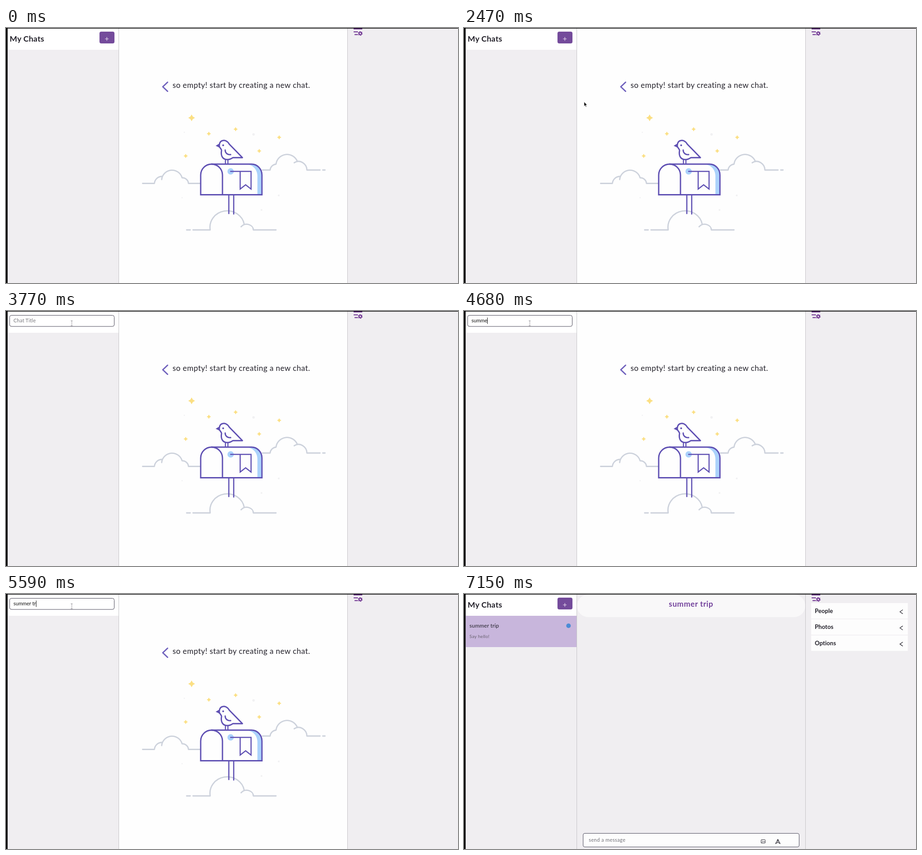
These frames come from a looping animation (996 px wide and 562 px high, 8 s). An HTML page:

```html
<!DOCTYPE html>
<html lang="en">
<head>
<meta charset="utf-8">
<title>Creating a chat</title>
<style>
  html, body { margin: 0; width: 100%; height: 100%; overflow: hidden; background: #f0eef1; }
  svg { display: block; font-family: Lato, "Open Sans", sans-serif; fill: #24222b; }
  text { white-space: pre; }
  .line { fill: none; stroke-linecap: round; stroke-linejoin: round; }
  .bold { font-weight: 700; }
  .cloud { stroke: #cdd2dc; stroke-width: 2.8; }
  .ink { stroke: #5f50b3; stroke-width: 2.9; }
  .off { display: none; }
</style>
</head>
<body>
<svg width="996" height="562" viewBox="0 0 996 562">
  <rect width="996" height="562" fill="#f0eef1"/>
  <rect x="4" y="1" width="244" height="47" fill="#fff"/>

  <g id="empty">
    <rect x="249" y="1" width="503" height="561" fill="#fefefe"/>
    <path class="line" d="M356 119.5L345.5 129.5L356 139.5" stroke="#7062bd" stroke-width="3"/>
    <text x="367" y="132" font-size="17" letter-spacing=".42">so empty! start by creating a new chat.</text>
    <g id="stars" fill="#fbdf83"></g>
    <g fill="#f1f1f3">
      <circle cx="545.5" cy="234.5" r="2.8"/>
      <circle cx="601" cy="369" r="2"/>
      <circle cx="563" cy="401" r="2"/>
      <circle cx="388" cy="374" r="1.4"/>
      <circle cx="393" cy="230" r="1.4"/>
    </g>
    <g class="line cloud">
      <path d="M301 342.5H327A17 17 0 0 1 343 327M343 334A23 23 0 0 1 388 330A14 13 0 0 1 402 342.5H428"/>
      <path d="M565 313H582A15 14 0 0 1 595 300A24.5 24.5 0 0 1 642 294M635 297C648 288 663 300 663 313H692M698 313H703"/>
      <path d="M398 445H406M412 445H450A38 36 0 0 1 525 433M518 438C528 427 545 434 545 445H595"/>
    </g>
    <path d="M534 301H541A23 24 0 0 1 564 324V367H554V326C554 314 546 303 534 301Z" fill="#abd2fb"/>
    <circle cx="495" cy="316" r="7" fill="#abd2fb"/>
    <g class="line ink" style="stroke-linejoin:miter">
      <path d="M429 367.5V324A24 24 0 0 1 477 324V367.5Z"/>
      <path d="M453 300H541A23 24 0 0 1 564 324V367.5H477"/>
      <path d="M495 316H540V355L528 345.5L516 355V316" stroke-width="2.5"/>
      <path d="M491 369V409M501.8 369V410" stroke-width="2.6"/>
      <path d="M483.5 290V299M489 290V299" stroke-width="2.4"/>
    </g>
    <path class="line ink" d="M521 285.7L492 256C488 249 482 247 478 248C472 249 470 254 470 260C470 264 475 266 475 270C473 280 476 290 488 290C494 290 498 287 500 285.7Z"/>
    <path class="line ink" d="M483 269C483 276 489 280 495 279" stroke-width="2.4"/>
    <path d="M462 259.5L470.5 254.5L471 264Z" fill="#5f50b3"/>
    <circle cx="478.5" cy="258.5" r="2" fill="#5f50b3"/>
  </g>

  <g id="room">
    <rect x="249" y="1" width="503" height="50" rx="25" fill="#f9f8f9"/>
    <text class="bold" x="500.3" y="28" font-size="17" letter-spacing=".6" text-anchor="middle" fill="#73429c">summer trip</text>
    <rect x="262.5" y="527.5" width="476" height="30" rx="3.5" fill="#fdfdfd" stroke="#4a485a"/>
    <text x="275" y="546" font-size="11" letter-spacing=".4" fill="#6f6f76">send a message</text>
    <g class="line" stroke="#33313a">
      <rect x="654.7" y="541.5" width="9" height="7.5" rx=".8"/>
      <path d="M656 548L658.5 545L660 546.5L661.5 545L663 547M657 543.8h.3"/>
      <path d="M691.6 540.5L696.7 550.3L691.6 547.3L686.5 550.3ZM691.6 541V547" stroke-width="1.2"/>
    </g>
    <g id="panels"></g>
  </g>

  <g id="row">
    <rect id="active" x="4" y="48" width="245" height="69" fill="#c8b6dc"/>
    <text x="12" y="74" font-size="12" letter-spacing=".15">summer trip</text>
    <text x="12" y="97" font-size="10" letter-spacing=".27" fill="#68616f">Say hello!</text>
    <circle cx="230.3" cy="70" r="5" fill="#4b8cd6"/>
  </g>

  <path d="M248.5 1V562M752.5 1V562" stroke="#c6c4c8"/>

  <g id="title">
    <text class="bold" x="8" y="29.5" font-size="17.5" letter-spacing=".3">My Chats</text>
    <rect x="206" y="8" width="33" height="26" rx="4" fill="#744b9b"/>
    <path d="M218.2 24H226.2M222.2 20V28" stroke="#efe6f5" stroke-width="1.1"/>
  </g>

  <g id="form">
    <rect x="8" y="9.5" width="230.5" height="24.5" rx="4" fill="#fff" stroke="#4b4858"/>
    <text id="hint" x="16.5" y="25.3" font-size="11" letter-spacing=".25" fill="#74747a">Chat Title</text>
    <text id="typed" x="16.5" y="25.3" font-size="11" fill="#111"></text>
    <path id="caret" d="M0 14.5V28.5" stroke="#111"/>
  </g>

  <g stroke="#6c3090" fill="none" stroke-width="2">
    <path d="M766 2H785M766 8.5H775.5M768 14.5H775.5"/>
    <circle cx="780.7" cy="12" r="2.7"/>
    <circle cx="780.7" cy="12" r="4.3" stroke-width="1.5" stroke-dasharray="2.25 2.25"/>
  </g>

  <path id="arrow" d="M0 0V10.2L2.3 8.1L4 11.8L5.6 11L4 7.5H7Z" fill="#151515" stroke="#fff" stroke-width=".8"/>
  <path id="beam" d="M143 21.5H147M145 22V32M143 32.5H147" fill="none" stroke="#77757c" stroke-dasharray="2 1"/>

  <path d="M0 0H996V1.2H3.5V562H0Z" fill="#000"/>
</svg>
<script>
const LOOP = 8000, STEP = 130;
const el = id => document.getElementById(id);
const show = (id, on) => el(id).classList.toggle('off', !on);

// x, y, radius
const stars = [[409, 198, 7.5], [447, 233, 4.8], [506, 223, 4.8], [602, 241, 4.8], [558, 271, 4.8], [396, 282, 4.8]];
el('stars').innerHTML = stars.map(([x, y, r]) => {
  const k = r * 0.36;
  return `<path d="M${x} ${y - r}l${k} ${r - k}l${r - k} ${k}l${k - r} ${k}l${-k} ${r - k}l${-k} ${k - r}l${k - r} ${-k}l${r - k} ${-k}z"/>`;
}).join('');

el('panels').innerHTML = ['People', 'Photos', 'Options'].map((label, i) => {
  const y = 20 + i * 35.6;
  return `<rect x="765" y="${y}" width="213" height="34.2" fill="#fdfdfd"/>
    <text class="bold" x="773" y="${y + 21.7}" font-size="13" letter-spacing=".05">${label}</text>
    <path class="line" d="M966.5 ${y + 15}L960.5 ${y + 19.2}L966.5 ${y + 23.4}" stroke="#33313a" stroke-width="1.3"/>`;
}).join('');

// time, x, y
const path = [[1300, 455, 448], [1690, 350, 285], [2080, 283, 188], [2340, 276, 178], [2470, 264.5, 162.5],
  [2860, 234, 60], [3120, 222, 25], [3380, 221, 23], [3640, 145, 22]];
// time, letters typed
const keys = [[0, 0], [4030, 1], [4160, 2], [4290, 3], [4550, 4], [4680, 5], [4940, 6], [5200, 7],
  [5330, 8], [5590, 9], [5720, 10], [5850, 11], [6370, 0]];

function pointAt(t) {
  const i = path.findIndex(p => p[0] > t);
  if (i < 0) return path[path.length - 1].slice(1);
  if (i === 0) return path[0].slice(1);
  const a = path[i - 1], b = path[i], f = (t - a[0]) / (b[0] - a[0]);
  return [a[1] + (b[1] - a[1]) * f, a[2] + (b[2] - a[2]) * f];
}

function draw() {
  const now = performance.now() % LOOP;
  const t = Math.floor(now / STEP) * STEP;
  const open = t >= 3380 && t < 6890;
  const done = t >= 6890;
  const count = keys.filter(k => k[0] <= t).pop()[1];

  show('empty', !done);
  show('room', done);
  show('row', done);
  show('active', t >= 7150);
  show('title', !open);
  show('form', open);
  show('arrow', t >= 1300 && t < 3640);
  show('beam', t >= 3640 && t < 6370);
  show('hint', count === 0);
  show('caret', count > 0);

  const [x, y] = pointAt(t);
  el('arrow').setAttribute('transform', `translate(${x} ${y})`);

  const typed = el('typed');
  typed.textContent = 'summer trip'.slice(0, count);
  if (count) {
    const end = Math.round(16.5 + typed.getComputedTextLength()) + 0.5;
    el('caret').setAttribute('transform', `translate(${end} 0)`);
  }
  requestAnimationFrame(draw);
}
draw();
</script>
</body>
</html>
```
